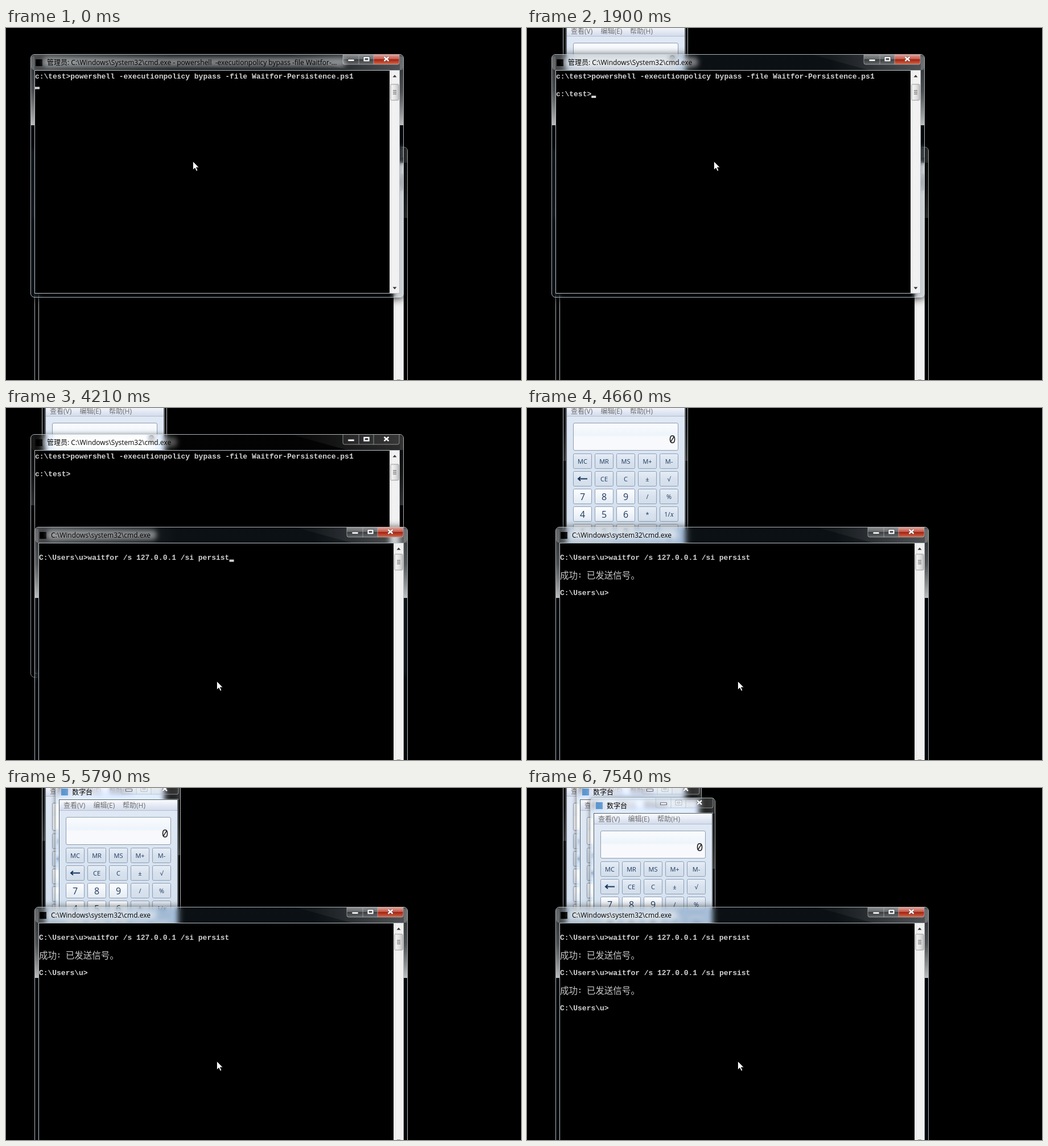
An HTML page for the animation above (8 s loop, 905 px wide and 619 px high).

```html
<!DOCTYPE html>
<html lang="zh-CN">
<head>
<meta charset="utf-8">
<title>Desktop</title>
<style>
html, body { margin: 0; width: 100%; height: 100%; overflow: hidden; background: #000; }
#stage { position: relative; width: 905px; height: 619px; overflow: hidden; background: #000; }
.win { position: absolute; }
.glass { position: absolute; inset: 0; border-radius: 7px; box-shadow: 0 1px 9px rgba(0, 0, 0, .55);
  backdrop-filter: blur(4px) saturate(1.6) brightness(1.06); }
.on > .glass { background: rgba(40, 90, 140, .07); box-shadow: 0 2px 14px rgba(0, 0, 0, .8);
  backdrop-filter: blur(4px) saturate(2) brightness(.9); }
svg { position: absolute; left: 0; top: 0; overflow: visible; }
text { font: 12px 'Open Sans', 'Noto Sans CJK SC', 'Noto Sans CJK', sans-serif; white-space: pre; }
.con { font: bold 12.96px 'Liberation Mono', monospace; fill: #d2d2d2; }
.zh { font: 15.55px 'Noto Sans CJK SC', 'Noto Sans CJK', sans-serif; fill: #c8c8c8; }
.glow { fill: #fff; opacity: .32; filter: url(#soft); }
.on .glow { opacity: .46; }
.shine { opacity: .25; }
.on .shine { opacity: 1; }
.hot { opacity: 0; }
.on .hot { opacity: 1; }
.menu { fill: #6d6d6d; }
.on .menu { fill: #111; }
.key { fill: #1f3a5f; text-anchor: middle; font-size: 11px; }
.num { font-size: 16px; }
.zero { font: 20px 'Noto Sans Mono', monospace; text-anchor: end; fill: #222; }
</style>
</head>
<body>
<div id="stage">
<svg width="0" height="0"><defs>
  <filter id="soft" x="-20%" y="-80%" width="140%" height="260%"><feGaussianBlur stdDeviation="4"/></filter>
  <linearGradient id="side" x2="0" y2="1"><stop stop-color="#aaa" stop-opacity=".25"/><stop offset=".5" stop-color="#bbb" stop-opacity=".4"/><stop offset="1" stop-color="#ddd" stop-opacity=".85"/></linearGradient>
  <linearGradient id="top"><stop stop-color="#ccc" stop-opacity=".36"/><stop offset=".38" stop-color="#abb" stop-opacity=".06"/><stop offset=".75" stop-color="#abb" stop-opacity=".06"/><stop offset="1" stop-color="#ccc" stop-opacity=".28"/></linearGradient>
  <linearGradient id="ray"><stop stop-color="#ccc" stop-opacity=".03"/><stop offset="1" stop-color="#ccc" stop-opacity=".16"/></linearGradient>
  <linearGradient id="cap" x2="0" y2="1"><stop stop-color="#ccc" stop-opacity=".6"/><stop offset=".48" stop-color="#999" stop-opacity=".45"/><stop offset=".5" stop-color="#333" stop-opacity=".5"/><stop offset="1" stop-color="#999" stop-opacity=".4"/></linearGradient>
  <linearGradient id="red" x2="0" y2="1"><stop stop-color="#dfa79d"/><stop offset=".48" stop-color="#c4574a"/><stop offset=".5" stop-color="#a5200f"/><stop offset="1" stop-color="#cf6a4c"/></linearGradient>
  <linearGradient id="track"><stop stop-color="#e3e3e3"/><stop offset=".3" stop-color="#f2f2f2"/><stop offset="1" stop-color="#f0f0f0"/></linearGradient>
  <linearGradient id="thumb"><stop stop-color="#f7f7f7"/><stop offset=".5" stop-color="#e4e4e4"/><stop offset="1" stop-color="#c6c6c8"/></linearGradient>
  <linearGradient id="body" x2="0" y2="1"><stop stop-color="#e0e9f5"/><stop offset="1" stop-color="#d0ddec"/></linearGradient>
  <linearGradient id="bar" x2="0" y2="1"><stop stop-color="#fafbfd"/><stop offset=".5" stop-color="#e6ebf5"/><stop offset="1" stop-color="#d3dcec"/></linearGradient>
  <linearGradient id="disp" x2="0" y2="1"><stop stop-color="#fbfcfe"/><stop offset=".45" stop-color="#edf4fb"/><stop offset=".5" stop-color="#f8f9fc"/><stop offset="1" stop-color="#f8f9fc"/></linearGradient>
  <linearGradient id="numkey" x2="0" y2="1"><stop stop-color="#fdfeff"/><stop offset="1" stop-color="#e3ebf4"/></linearGradient>
  <linearGradient id="opkey" x2="0" y2="1"><stop stop-color="#e6edf6"/><stop offset=".5" stop-color="#d8e2ee"/><stop offset="1" stop-color="#d3deeb"/></linearGradient>
</defs></svg>
</div>
<script>
const stage = document.getElementById('stage');
const $ = id => document.getElementById(id);
const rect = (x, y, w, h, more = '') => `<rect x="${x}" y="${y}" width="${w}" height="${h}" ${more}/>`;
const path = (d, more = '') => `<path d="${d}" ${more}/>`;
const text = (x, y, s, cls = '', more = '') => `<text x="${x}" y="${y}" class="${cls}" ${more}>${s}</text>`;

// Minimise, maximise and close buttons.
function caps(x, a, b, c, dim) {
  const end = x + a + b + c, cx = end - c / 2, mx = x + a + b / 2;
  const box = `M${x} .5V15q0 3 3 3H${end - 3}q3 0 3-3V.5`;
  const white = 'fill="#fff" stroke="#3c4048" stroke-width=".8"';
  return path(box, 'fill="#999" fill-opacity=".1"') +
    `<g class="hot">${path(box, 'fill="url(#cap)"')}` +
    path(`M${x + a + b} .5V18H${end - 3}q3 0 3-3V.5Z`, 'fill="url(#red)"') + '</g>' +
    path(`${box}M${x + a} .5V18M${x + a + b} .5V18`, 'fill="none" stroke="#b4bac0" stroke-opacity=".7"') +
    rect(x + a / 2 - 5, 9, 11, 3.6, white) +
    path(`M${mx - 5} 4.5h11v8.5h-11zm3 3v2.5h5v-2.5z`, `${white} fill-rule="evenodd" opacity="${dim ? .4 : 1}"`) +
    path(`M${cx - 4} 5l8 7m0-7l-8 7`, 'stroke="#3c4048" stroke-width="3.6"') +
    path(`M${cx - 4} 5l8 7m0-7l-8 7`, 'stroke="#fff" stroke-width="2.4"');
}

function win(x, y, w, h, inner) {
  const el = document.createElement('div');
  el.className = 'win';
  el.style.cssText = `left:${x}px;top:${y}px;width:${w}px;height:${h}px`;
  el.innerHTML = `<div class="glass"></div><svg width="${w}" height="${h}">
    <g class="shine">${rect(1, 1, w - 2, 27, 'fill="url(#top)" rx="6"')}
    ${rect(1, 4, 6, 121, 'fill="url(#side)"')}${rect(w - 7, 4, 6, 121, 'fill="url(#side)"')}</g>
    ${path(`M${w * .7} 1H${w - 5}L${w - 1} 6V28H${w * .85}Z`, 'fill="url(#ray)"')}
    ${rect(.5, .5, w - 1, h - 1, 'rx="6.5" fill="none" stroke="#ccd4d8" stroke-opacity=".85"')}${inner}</svg>`;
  stage.append(el);
  return el;
}

const title = (s, len) => rect(22, 5, len + 16, 18, 'rx="8" class="glow"') + text(29, 18.5, s);

function terminal(x, y, thumb, inner) {
  const grip = [-3, 0, 3].map(d => `M637 ${thumb + 14 + d}h6`).join('');
  return win(x, y, 656, 428,
    rect(9, 9, 12, 12, 'fill="#000"') + caps(549, 28, 26, 45) +
    rect(7.5, 28.5, 641, 392, 'fill="#000" stroke="#b9c0c4"') +
    rect(631, 29, 17, 391, 'fill="url(#track)"') +
    path('M636.5 40.5l3.5-4 3.5 4zM636.5 409.5l3.5 4 3.5-4z', 'fill="#333"') +
    rect(633, thumb, 14, 28, 'rx="1.5" fill="url(#thumb)" stroke="#999"') +
    path(grip, 'stroke="#555"') + inner);
}

const line = k => 42.5 + 15.5 * k;
const row = (k, s, id = '') => text(8, line(k), s, 'con', id && `id="${id}"`);
const caret = (id, col, k) => rect(8 + col * 7.78, line(k) - .5, 8, 4, `id="${id}" fill="#d2d2d2"`);
const reply = k => text(8, line(k) + 1.5, '成功', 'zh') + text(39.1, line(k), ':', 'con') +
  text(54.7, line(k) + 1.5, '已发送信号。', 'zh');

function calculator(x, y) {
  const labels = [['MC', 'MR', 'MS', 'M+', 'M-'], ['', 'CE', 'C', '±', '√'], ['7', '8', '9', '/', '%'],
    ['4', '5', '6', '*', '1/<tspan font-style="italic" font-family="Noto Serif, serif">x</tspan>'],
    ['1', '2', '3', '-', '='], ['0', null, '.', '+', null]];
  let keys = '';
  labels.forEach((line, r) => line.forEach((s, c) => {
    if (s === null) return;
    const kx = 18.5 + 38 * c, ky = 112.5 + 31 * r;
    const kw = s === '0' ? 70 : 32, kh = s === '=' ? 57 : 26, digit = /^[0-9]$/.test(s);
    keys += rect(kx, ky, kw, kh, `rx="2" fill="url(#${digit ? 'numkey' : 'opkey'})" stroke="#8b9db4"`) +
      text(kx + kw / 2, ky + kh / 2 + (digit ? 6 : 4), s, digit ? 'key num' : 'key',
        s === '=' ? 'style="font-size:20px"' : '');
  }));
  keys += path('M27 156.5h16M31 153l-4 3.5 4 3.5', 'fill="none" stroke="#17365d" stroke-width="2"');
  return win(x, y, 220, 311,
    rect(10, 8, 12, 12, 'fill="#5b96cf"') + title('数字台', 36) + caps(115, 27, 26, 48, true) +
    rect(5.5, 26.5, 210, 279, 'fill="none" stroke="#fff" stroke-opacity=".4"') +
    rect(6.5, 27.5, 208, 277, 'fill="url(#body)" stroke="#4c5a68"') +
    rect(7, 28, 207, 18, 'fill="url(#bar)"') + path('M7 46.5h207', 'stroke="#b6bccc"') +
    text(14, 42, '查看(V)', 'menu') + text(66.5, 42, '编辑(E)', 'menu') + text(118, 42, '帮助(H)', 'menu') +
    rect(18.5, 58.5, 184, 48, 'rx="2.5" fill="url(#disp)" stroke="#8e9cad"') +
    text(198.5, 94, '0', 'zero') + keys);
}

const raw = String.raw;
const send = 'waitfor /s 127.0.0.1 /si persist';
const home = raw`C:\Users\u&gt;`;
const wins = {
  A: terminal(43, 46, 53,
    `<g id="busy">${title(raw`管理员: C:\Windows\System32\cmd.exe - powershell  -executionpolicy bypass -file Waitfor-...`, 516)}</g>` +
    `<g id="idle">${title(raw`管理员: C:\Windows\System32\cmd.exe`, 220)}</g>` +
    row(0, raw`c:\test&gt;powershell -executionpolicy bypass -file Waitfor-Persistence.ps1`) +
    row(2, raw`c:\test&gt;`, 'ready') + caret('wait', 0, 1) + caret('prompt', 8, 2)),
  B: terminal(50, 209, 48,
    title(raw`C:\Windows\system32\cmd.exe`, 177) + row(1, home + send) + caret('first', 43, 1) +
    `<g id="sent">${reply(3)}${row(5, home)}</g>` +
    text(8 + 11 * 7.78, line(5), send, 'con', 'id="again"') + caret('second', 43, 5) +
    `<g id="resent">${reply(7)}${row(9, home)}</g>`),
  1: calculator(63, -32),
  2: calculator(87, -7),
  3: calculator(111, 17)
};
stage.insertAdjacentHTML('beforeend', `<svg id="mouse" width="12" height="20" style="z-index:9">${
  path('M.5 .5V15.5L4 12.2 6.4 17.6 8.8 16.5 6.4 11.2H11Z', 'fill="#fff" stroke="#000" stroke-width=".8"')}</svg>`);

const at = (t, list) => list.filter(s => s[0] <= t).pop()[1];
const show = (id, on) => { $(id).style.display = on ? '' : 'none'; };
const during = (t, ...spans) => spans.some(([a, b]) => t >= a && t < b);

// Back to front; the last window has the focus.
const order = [[0, 'BA'], [980, 'BA1'], [1900, 'B1A'], [2660, '1AB'], [4660, '1B'],
  [4810, '1B2'], [5790, '12B'], [6990, '12B3'], [7540, '123B']];
const fades = {
  A: [[0, 1], [4510, .5]],
  B: [[0, 1]],
  1: [[0, .3], [1100, .66], [1220, .9], [1340, 1]],
  2: [[0, .42], [4960, .85], [5080, 1]],
  3: [[0, .42], [7110, .8], [7260, 1]]
};
const moves = [[0, [328, 234]], [2210, [400, 366]], [2360, [381, 468]], [2510, [374, 503]], [2970, [370, 480]]];

function draw(t) {
  const stack = at(t, order);
  for (const name in wins) {
    const el = wins[name], z = stack.indexOf(name), p = at(t, fades[name]), k = 1 - p;
    el.style.display = z < 0 ? 'none' : '';
    el.style.zIndex = z + 1;
    el.className = z === stack.length - 1 ? 'win on' : 'win';
    el.style.opacity = p;
    const depth = name === 'A' ? .02 : .1;
    el.style.transform = k ? `perspective(1070px) translateY(${-50 * k * depth}px) rotateX(${-140 * k * depth}deg) scale(${1 - depth * k})` : 'none';
  }
  show('busy', t < 830);
  show('idle', t >= 830);
  show('ready', t >= 830);
  show('wait', t < 400);
  show('prompt', during(t, [1900, 2510]));
  show('first', during(t, [3120, 3680], [4210, 4360]));
  show('sent', t >= 4360);
  show('again', t >= 6190);
  show('second', during(t, [6340, 6460]));
  show('resent', t >= 6460);
  const [x, y] = at(t, moves);
  $('mouse').style.transform = `translate(${x}px, ${y}px)`;
}

function tick() {
  draw(performance.now() % 8000);
  requestAnimationFrame(tick);
}
tick();
</script>
</body>
</html>
```
